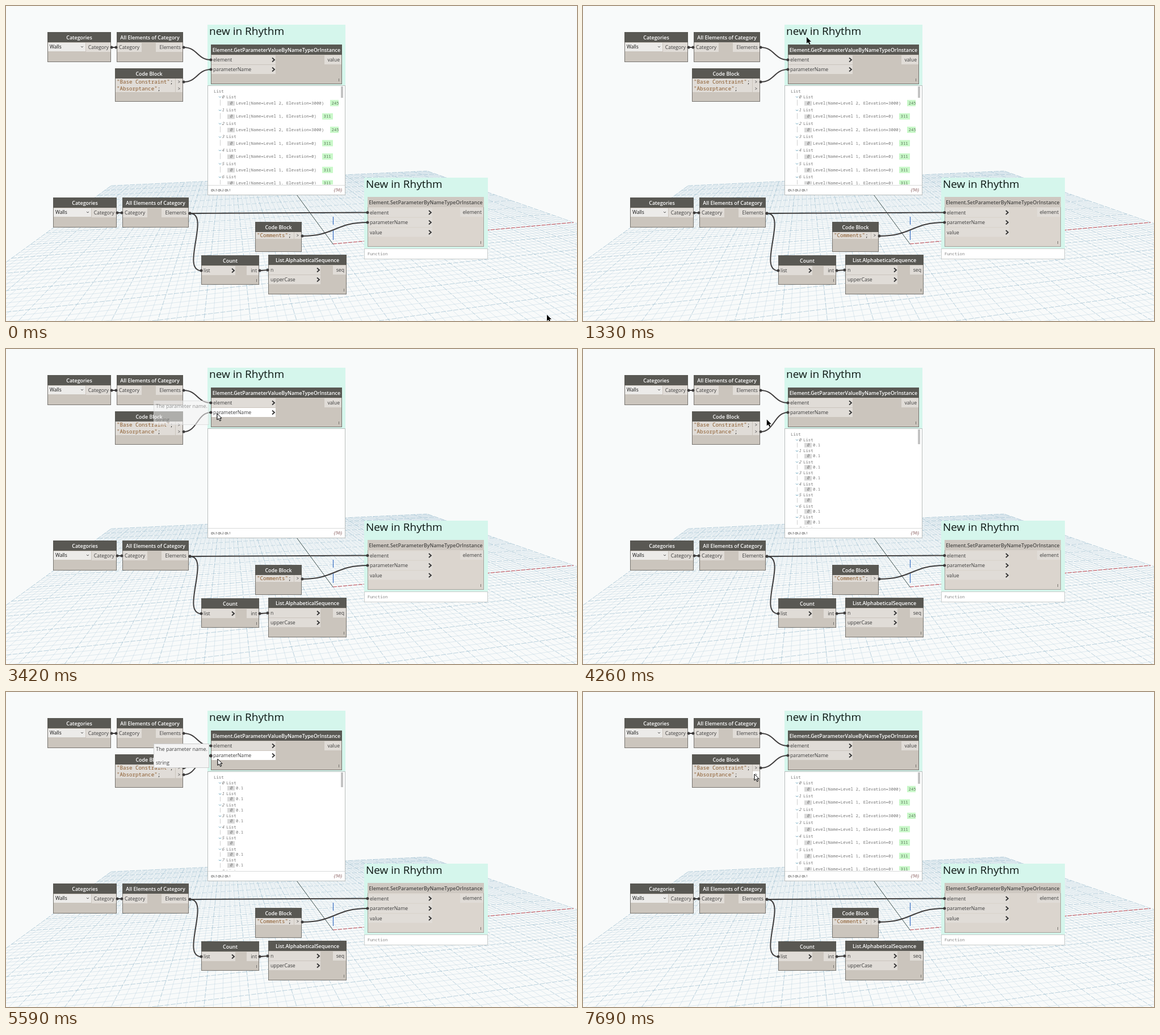
Animation of 1006x556 px, one loop 8 s. Source, as an HTML page with a canvas:

```html
<!DOCTYPE html>
<html lang="en">
<head>
<meta charset="utf-8">
<title>Node graph</title>
<style>
html, body { margin: 0; width: 100%; height: 100%; overflow: hidden; background: #f8fafa; }
canvas { display: block; }
</style>
</head>
<body>
<canvas id="stage" width="1006" height="556"></canvas>
<script>
const c = document.getElementById('stage').getContext('2d');
const SANS = '"Open Sans", "Noto Sans", sans-serif';
const MONO = '"Noto Sans Mono", "DejaVu Sans Mono", monospace';
const PORT = '8.7px ' + SANS, CODE = '9.2px ' + MONO, LIST = '7.4px ' + MONO;
const DARK = '#595853', BODY = '#cbc5bd', LIGHT = '#e0dcd7', INK = '#3f3d3d', MINT = '#d5f6ec';

function rect(x, y, w, h, fill, stroke) {
  c.fillStyle = fill;
  c.fillRect(x, y, w, h);
  if (stroke) {
    c.strokeStyle = stroke;
    c.lineWidth = 1;
    c.strokeRect(x + .5, y + .5, w - 1, h - 1);
  }
}

function text(s, x, y, font, color, align = 'left') {
  c.font = font;
  c.fillStyle = color;
  c.textAlign = align;
  c.fillText(s, x, y);
}

function line(points, color, width = 1, dash = []) {
  c.strokeStyle = color;
  c.lineWidth = width;
  c.setLineDash(dash);
  c.beginPath();
  points.forEach(p => c.lineTo(...p));
  c.stroke();
  c.setLineDash([]);
}

function dot(x, y) {
  c.fillStyle = INK;
  c.beginPath();
  c.arc(x, y, 2.5, 0, 7);
  c.fill();
}

function wire(x1, y1, x2, y2, bend = (x2 - x1) / 2, dash = []) {
  c.strokeStyle = INK;
  c.lineWidth = 2;
  c.setLineDash(dash);
  c.beginPath();
  c.moveTo(x1, y1);
  c.bezierCurveTo(x1 + bend, y1, x2 - bend, y2, x2, y2);
  c.stroke();
  c.setLineDash([]);
  dot(x1, y1);
  dot(x2, y2);
}

// Perspective ground plane, u and v in -1..1
function ground(u, v) {
  const w = 1 + .1767 * u + .8635 * v;
  return [(576 + 600.7 * u + 337 * v) / w, (420 + 29.5 * u + 144.6 * v) / w];
}

function drawGrid() {
  const n = 50, near = -.7;
  for (const major of [false, true]) {
    const color = major ? 'rgba(120,165,190,.62)' : 'rgba(165,195,212,.42)';
    const dash = major ? [9, 2] : [];
    for (let i = -n; i <= n; i++) {
      if ((i % 5 === 0) !== major) continue;
      const k = i / n;
      line([ground(k, near), ground(k, 1)], color, .8, dash);
      if (k >= near) line([ground(-1, k), ground(1, k)], color, .8, dash);
    }
  }
  line([ground(0, 0), ground(1, 0)], '#c8474f', 1, [7, 2]);
  line([ground(0, 0), ground(0, 1)], '#4a5a55');
  line([[576.5, 372], [576.5, 386]], '#3a6fc4', 1.2);
  line([[576.5, 396], [576.5, 413]], '#3a6fc4', 1.2);
}

function node(x, y, w, h, title, faded) {
  rect(x, y, w, h, faded ? '#dbd5ce' : BODY, faded ? '#a5a19b' : '#77746f');
  rect(x, y, w, 18, faded ? '#cec8c1' : DARK);
  text(title, x + w / 2, y + 13, '600 8.9px ' + SANS, faded ? '#4b4a48' : '#fff', 'center');
}

function chevron(x, y) {
  line([[x - 2, y - 3.5], [x + 2, y], [x - 2, y + 3.5]], '#333', 1.8);
}

function input(x, y, w, name, arrow, hot) {
  rect(x + 1, y - 8, w, 16, hot ? '#fff' : LIGHT);
  text(name, x + 4, y + 3, PORT, '#3c3c3c');
  if (arrow) chevron(x + w - 3, y);
}

function output(right, y, w, name) {
  rect(right - w, y - 8, w - 1, 16, LIGHT);
  text(name, right - 4, y + 3, PORT, '#3c3c3c', 'right');
}

const lacing = (x, y) => rect(x, y, 1, 5, '#77746f');

function categoryPair(x, y) {
  node(x, y, 112, 53, 'Categories');
  rect(x + 1, y + 19, 66, 15, '#ecebe9');
  text('Walls', x + 4, y + 29, '8.5px ' + SANS, '#111');
  line([[x + 59, y + 25], [x + 61, y + 27], [x + 63, y + 25]], '#555');
  output(x + 112, y + 27, 44, 'Category');
  node(x + 122, y, 117, 53, 'All Elements of Category');
  input(x + 122, y + 27, 43, 'Category');
  output(x + 239, y + 27, 48, 'Elements');
  wire(x + 113, y + 27, x + 121, y + 27);
}

function codeBlock(x, y, w, h, lines, hot) {
  node(x, y, w, h, 'Code Block');
  lines.forEach((s, i) => {
    const top = y + 18 + i * 12;
    rect(x + 1, top, w - 15, 12, LIGHT);
    rect(x + w - 13, top, 12, 12, i === hot ? '#fff' : LIGHT);
    text(s, x + 3, top + 9, CODE, '#8a5a2c');
    text(';', x + 3 + c.measureText(s).width, top + 9, CODE, '#222');
    text('>', x + w - 7, top + 9, '8px ' + MONO, '#444', 'center');
  });
}

function badge(x, y) {
  rect(x, y - 6, 13, 8, '#d9d9d9');
  text('0', x + 6.5, y, 'italic ' + LIST, '#777', 'center');
}

function drawList(mode) {
  rect(355, 140, 243, 194, '#fff', '#b9bdbc');
  line([[356, 316.5], [597, 316.5]], '#d8dada');
  text('@L3 @L2 @L1', 361, 327, '5.4px ' + SANS, '#333');
  text('{56}', 592, 327, 'italic 8px ' + SANS, '#7a4a4a', 'right');
  if (mode === 'blank') return;
  rect(590, 142, 4, mode === 'levels' ? 20 : 26, '#c3c3c3');
  c.save();
  c.beginPath();
  c.rect(356, 142, 230, 173);
  c.clip();
  text('List', 366, 153, LIST, '#777');
  const gap = mode === 'levels' ? 23.6 : 19.5;
  for (let i = 0; i < 9; i++) {
    const y = 162.5 + gap * i, low = y + gap / 2 - .5;
    line([[375, y - 3], [377, y - 1], [379, y - 3]], '#69a5bd');
    line([[377.5, y + 3], [377.5, low + 2]], '#d0d0d0');
    text(i, 380, y, 'italic ' + LIST, '#777');
    text('List', 388, y, LIST, '#777');
    badge(390, low);
    if (mode === 'values') {
      if (i !== 5) text('0.1', 405, low, LIST, '#777');
      continue;
    }
    const upper = i === 0 || i === 2, x = upper ? 571 : 557;
    text(`Level(Name=Level ${upper ? 2 : 1}, Elevation=${upper ? 3000 : 0})`, 405, low, LIST, '#777');
    rect(x, low - 8, 19, 11, '#c9f8c9');
    text(upper ? '245' : '311', x + 2.5, low, LIST, '#5c7a5c');
  }
  c.restore();
}

function drawTooltip(alpha) {
  c.globalAlpha = alpha;
  rect(260, 91, 98, 43, '#f4f4f4', '#ccc');
  text('The parameter name.', 264, 104, '9px ' + SANS, '#444');
  text('string', 264, 128, '9px ' + SANS, '#444');
  c.globalAlpha = 1;
}

function drawCursor(x, y, white, dragging) {
  if (dragging) {
    c.strokeStyle = '#222';
    c.lineWidth = 1.3;
    c.beginPath();
    c.moveTo(x + 4, y + 17);
    c.bezierCurveTo(x + 11, y + 17, x + 6, y + 6, x + 14, y + 5);
    c.stroke();
  }
  const shape = [[0, 0], [0, 11], [2.6, 8.7], [4.8, 13], [6.6, 12], [4.5, 8], [8, 8]];
  c.beginPath();
  shape.forEach(([dx, dy]) => c.lineTo(x + dx, y + dy));
  c.closePath();
  c.fillStyle = white ? '#fff' : '#000';
  c.strokeStyle = white ? '#111' : '#fff';
  c.lineWidth = white ? 1 : .5;
  c.stroke();
  c.fill();
  if (white) c.stroke();
}

// Linear track through [time, ...values]
function track(keys, t) {
  const i = keys.findIndex(k => k[0] > t);
  if (i < 0) return keys[keys.length - 1].slice(1);
  if (i === 0) return keys[0].slice(1);
  const a = keys[i - 1], b = keys[i], p = (t - a[0]) / (b[0] - a[0]);
  return a.slice(1).map((v, j) => v + (b[j + 1] - v) * p);
}

const pointer = [
  [20, 953, 545], [240, 860, 478], [640, 490, 235], [870, 402, 165], [1330, 394, 55],
  [1560, 394, 55], [1900, 352, 102], [2260, 303, 143], [2335, 303, 143], [2492, 357, 125],
  [2640, 370, 116], [2790, 372, 114], [3730, 372, 114], [4510, 303, 129], [4740, 303, 129],
  [4972, 341, 122], [5210, 373, 118], [6290, 373, 119], [6440, 430, 185], [7140, 430, 185],
  [7685, 302, 145]
];
const looseEnd = [
  [2410, 313, 146], [2492, 313, 142], [2640, 361, 113], [4700, 361, 113],
  [4701, 313, 134], [4815, 313, 134], [4972, 333, 126], [5210, 361, 113]
];
const tipFade = [
  [2880, 0], [3110, 1], [3300, 1], [3422, .55], [3570, 0],
  [5430, 0], [5590, 1], [6100, 1], [6280, 0]
];

function draw(t) {
  const within = (a, b) => t >= a && t < b;
  const onParam = within(2600, 3790) || within(5170, 6350);
  const hotPort = within(2240, 2400) || t > 7600 ? 1 : within(4490, 4790) ? 0 : -1;
  const swapped = within(3330, 6130);
  const mode = within(3330, 3550) || within(6200, 6420) ? 'blank' : swapped || within(6130, 6200) ? 'values' : 'levels';

  rect(0, 0, 1006, 556, '#f8fafa');
  drawGrid();

  rect(355, 33, 243, 108, MINT);
  text('new in Rhythm', 358, 51, '19px ' + SANS, '#0c1512');
  categoryPair(73, 46);
  codeBlock(192, 110, 120, 59, ['"Base Constraint"', '"Absorptance"'], hotPort);
  node(361, 68, 231, 70, 'Element.GetParameterValueByNameTypeOrInstance');
  input(361, 95, 113, 'element', true);
  input(361, 112, 113, 'parameterName', true, onParam);
  output(592, 95, 31, 'value');
  lacing(586, 128);
  wire(313, 73, 361, 95);
  wire(313, swapped ? 146 : 134, 361, 112);
  drawList(mode);

  rect(631, 303, 218, 125, MINT);
  text('New in Rhythm', 634, 321, '19px ' + SANS, '#0c1512');
  categoryPair(83, 338);
  codeBlock(439, 381, 82, 53, ['"Comments"']);
  node(637, 337, 205, 88, 'Element.SetParameterByNameTypeOrInstance', true);
  ['element', 'parameterName', 'value'].forEach((s, i) => input(637, 364.5 + i * 17.5, 113, s, true));
  output(842, 364, 42, 'element');
  lacing(836, 415);
  rect(631, 428, 218, 19, '#fff', '#c9cdcc');
  text('Function', 637, 440, LIST, '#888');
  node(344, 440, 102, 52, 'Count');
  input(344, 467, 59, 'list', true);
  output(446, 467, 22, 'int');
  lacing(441, 482);
  node(462, 439, 138, 70, 'List.AlphabeticalSequence');
  input(462, 466, 91, 'n', true);
  input(462, 483, 91, 'upperCase', true);
  output(600, 466, 24, 'seq');
  lacing(595, 499);
  wire(324, 366, 637, 364.5);
  wire(324, 366, 344, 467, 37);
  wire(522, 406, 637, 382);
  wire(447, 467, 461, 466);

  if (within(2400, 3330)) wire(313, 146, ...track(looseEnd, t), undefined, [4, 3]);
  if (within(4790, 6130)) wire(313, 134, ...track(looseEnd, t), undefined, [4, 3]);
  const [alpha] = track(tipFade, t);
  if (alpha > 0) drawTooltip(alpha);
  const dragging = within(2400, 2600) || within(4790, 5170);
  drawCursor(...track(pointer, t), onParam || hotPort >= 0, dragging);
}

// The screen advances in discrete ticks
const TICK = 77.5;
let last;
function frame(now) {
  const tick = Math.floor((now % 8000 - 1315) / TICK);
  if (tick !== last) draw(1330 + tick * TICK);
  last = tick;
  requestAnimationFrame(frame);
}
requestAnimationFrame(frame);
</script>
</body>
</html>
```
